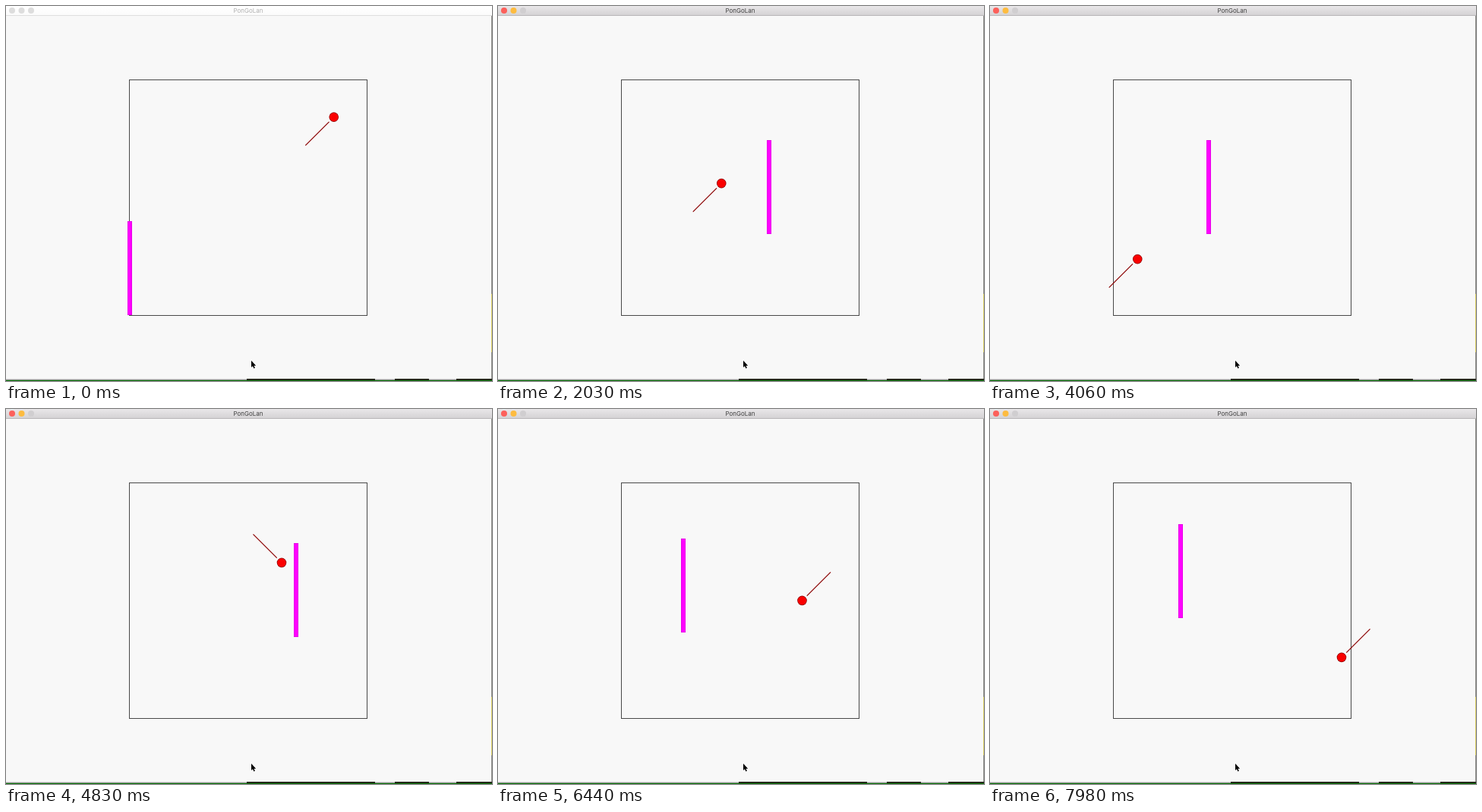
Write an HTML page with a canvas that moves like this. It is 640 px wide and 495 px high and loops after 8000 ms.

```html
<!DOCTYPE html>
<html lang="en">
<head>
<meta charset="utf-8">
<title>PonGoLan</title>
<style>
  html, body { margin: 0; width: 100%; height: 100%; overflow: hidden; }
  canvas { display: block; }
</style>
</head>
<body>
<canvas id="stage" width="640" height="495"></canvas>
<script>
const ctx = document.getElementById('stage').getContext('2d');

const LOOP = 8000, STEP = 70, TICKS_PER_STEP = 4.008, START_LAG = 2;
const CELL = 6.25, LEFT = 163, TOP = 97, SIZE = 50, PADDLE_LENGTH = 20;
const px = c => LEFT + c * CELL;
const py = c => TOP + c * CELL - 0.4;
const clamp = (v, low, high) => Math.min(high, Math.max(low, v));

// The player's moves: [tick, column]. The ball follows from them.
const MOVES = [[0, 0], [59, 17], [105, 31], [114, 31], [160, 26], [182, 19],
  [210, 26], [230, 20], [271, 37], [318, 12], [411, 13], [418, 10], [455, 14]];

function paddleAt(tick) {
  const i = Math.max(1, MOVES.findIndex(([when]) => when >= tick));
  const [a, from] = MOVES[i - 1], [b, to] = MOVES[i];
  return {
    x: Math.round(from + (to - from) * (tick - a) / (b - a)),
    y: Math.round(30 - clamp(tick * 0.4, 0, 17) - clamp((tick - 360) / 6, 0, 4))
  };
}

const atWall = (v, dir) => v === (dir > 0 ? SIZE : 0);

function hitsPaddle(ball, paddle) {
  const gap = (paddle.x - ball.x) * ball.dx;
  return gap > 0 && gap <= 1 && ball.y >= paddle.y && ball.y <= paddle.y + PADDLE_LENGTH;
}

function ballAt(lastTick) {
  const ball = { x: 43, y: 8, dx: -1, dy: 1 };
  for (let tick = 1; tick <= lastTick; tick++) {
    ball.x += ball.dx;
    ball.y += ball.dy;
    if (atWall(ball.x, ball.dx) || hitsPaddle(ball, paddleAt(tick))) ball.dx *= -1;
    if (atWall(ball.y, ball.dy)) ball.dy *= -1;
  }
  return ball;
}

function rect(color, x, y, w, h) {
  ctx.fillStyle = color;
  ctx.fillRect(x, y, w, h);
}

function disc(color, x, y, r) {
  ctx.fillStyle = color;
  ctx.beginPath();
  ctx.arc(x, y, r, 0, 2 * Math.PI);
  ctx.fill();
}

function drawDesktopEdge() {
  rect('#f8f8f8', 0, 0, 640, 495);
  rect('#d4d4d4', 0, 492, 640, 1);
  rect('#8c948c', 0, 493, 640, 1);
  for (const [x, w] of [[317, 169], [512, 45], [593, 47]]) rect('#24281a', x, 492, w, 2);
  rect('#087408', 0, 494, 640, 1);
  rect('#8b8b86', 639, 13, 1, 479);
  rect('#d8cc60', 639, 380, 1, 77);
}

function drawTitleBar(active) {
  const shade = ctx.createLinearGradient(0, 0, 0, 13);
  shade.addColorStop(0, active ? '#e9e7e9' : '#ffffff');
  shade.addColorStop(1, active ? '#d3d1d3' : '#fbfbfb');
  rect(shade, 0, 0, 640, 12);
  rect(active ? '#b8b6b8' : '#dedede', 0, 12, 640, 1);
  const lights = active ? ['#fc605b', '#fdbc40', '#d0ced0'] : Array(3).fill('#dddddd');
  lights.forEach((color, i) => disc(color, 8 + i * 12.5, 6.1, 4));
  ctx.fillStyle = active ? '#404040' : '#b0b0b0';
  ctx.font = '8px Inter, "Liberation Sans", sans-serif';
  ctx.textAlign = 'center';
  ctx.fillText('PonGoLan', 319, 9.3);
}

function drawCourt() {
  ctx.strokeStyle = '#484848';
  ctx.lineWidth = 1;
  ctx.strokeRect(162.5, 97.5, 313, 311);
}

function drawPaddle({ x, y }) {
  const left = Math.round(px(x) - 3), top = Math.floor(py(y));
  const height = Math.floor(PADDLE_LENGTH * CELL) - 1;
  rect('#d400d4', left, top, 6, height);
  rect('#ff00ff', left + 0.5, top + 0.5, 5, height - 1);
}

function drawBall({ x, y, dx, dy }) {
  ctx.strokeStyle = '#8a0000';
  ctx.lineWidth = 1.2;
  ctx.beginPath();
  ctx.moveTo(px(x + dx), py(y + dy));
  ctx.lineTo(px(x + 6 * dx), py(y + 6 * dy));
  ctx.stroke();
  disc('#8a0000', px(x), py(y), 6.3);
  disc('#fa0000', px(x), py(y), 5.6);
}

function drawCursor() {
  const arrow = new Path2D('M323 468v9l2-1.8 1.4 3.2 1.5-.7-1.4-3h2.7z');
  ctx.strokeStyle = '#fff';
  ctx.lineWidth = 1.4;
  ctx.stroke(arrow);
  ctx.fillStyle = '#000';
  ctx.fill(arrow);
}

function draw(now) {
  const step = Math.floor(now % LOOP / STEP);
  const tick = Math.max(0, Math.round(step * TICKS_PER_STEP - START_LAG));
  drawDesktopEdge();
  drawTitleBar(step > 0);
  drawCourt();
  drawPaddle(paddleAt(tick));
  drawBall(ballAt(tick));
  drawCursor();
}

const start = performance.now();
function loop() {
  draw(performance.now() - start);
  requestAnimationFrame(loop);
}
loop();
</script>
</body>
</html>
```
